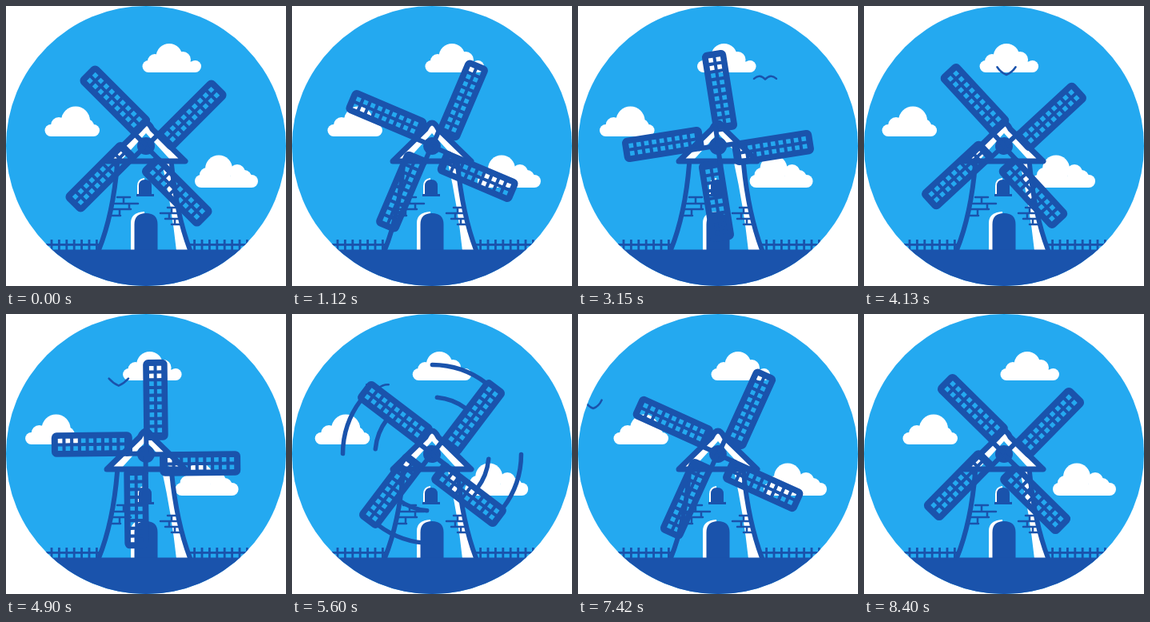
Recreate the animation shown at these times as an HTML page with a canvas. Size 350 by 350 pixels, loop 8470 ms.

```html
<!DOCTYPE html>
<html lang="en">
<head>
<meta charset="utf-8">
<title>Windmill</title>
<style>
  html, body { margin: 0; width: 100%; height: 100%; overflow: hidden; background: #fff; }
  canvas { display: block; width: 100vmin; height: 100vmin; }
</style>
</head>
<body>
<canvas id="stage"></canvas>
<script>
const SIZE = 350, LOOP = 8470, STEP = 70;
const START = 75, TURN = 4266, END = 8458, SWING = TURN - START;
const SKY = '#24a9f0', NAVY = '#1a53ac', WHITE = '#fff';
const canvas = document.getElementById('stage');
const ctx = canvas.getContext('2d');
const scale = Math.max(1, window.devicePixelRatio || 1);
canvas.width = canvas.height = SIZE * scale;

const rad = deg => deg * Math.PI / 180;
const clamp = v => Math.min(1, Math.max(0, v));
const smooth = v => { v = clamp(v); return v * v * (3 - 2 * v); };

function fill(color, path) {
  ctx.fillStyle = color;
  ctx.fill(new Path2D(path));
}

function stroke(width, path) {
  ctx.lineWidth = width;
  ctx.strokeStyle = NAVY;
  ctx.stroke(new Path2D(path));
}

function disc(x, y, r) {
  ctx.beginPath();
  ctx.arc(x, y, r, 0, 2 * Math.PI);
  ctx.fill();
}

// Each cloud: base line y, then its puffs as [x, y, radius]; the first and last puffs are its ends.
const clouds = [
  [83, [178, 75.5, 7.5], [186, 69, 9], [204, 63.5, 16.5], [221, 67, 10], [236.5, 75.5, 7.5]],
  [163, [56, 155.5, 7.5], [66, 149, 10], [87, 143.5, 18], [101, 150, 9], [109.5, 155.5, 7.5]],
  [227, [244, 219, 8], [251, 211, 9], [266, 203.5, 17], [289, 208, 10], [298, 214, 9], [307, 219, 8]]
];

function drawClouds(shift) {
  ctx.save();
  ctx.translate(shift, 0);
  ctx.fillStyle = WHITE;
  for (const [base, ...puffs] of clouds) {
    puffs.forEach(p => disc(...p));
    const left = puffs[0], right = puffs[puffs.length - 1];
    ctx.fillRect(left[0], left[1] - 6, right[0] - left[0], base - left[1] + 6);
  }
  ctx.restore();
}

// Flight path: time, x, y
const flight = [
  [1200, 341, 89], [2240, 286, 97], [4130, 178, 86],
  [5600, 107, 93], [6580, 61, 111], [7900, -5, 122]
];

function drawBird(t) {
  const i = flight.findIndex(p => p[0] > t);
  if (i < 1) return;
  const [t0, x0, y0] = flight[i - 1], [t1, x1, y1] = flight[i];
  const k = (t - t0) / (t1 - t0);
  const flap = 0.4 + 0.6 * Math.cos(2 * Math.PI * (t - 6580) / 790);
  const span = 14 - 4 * Math.max(0, flap) ** 4;
  const tip = -11 * flap, bend = -8 + 6 * flap;
  ctx.save();
  ctx.translate(x0 + (x1 - x0) * k, y0 + (y1 - y0) * k);
  stroke(2.5, `M${-span} ${tip}Q-7 ${bend} 0 0Q7 ${bend} ${span} ${tip}`);
  ctx.restore();
}

function drawFence() {
  ctx.fillStyle = NAVY;
  ctx.fillRect(40, 297, 270, 2.8);
  for (let x = 57; x < 305; x += 9.4) ctx.fillRect(x - 1.4, 292, 2.8, 14);
}

function drawMill() {
  fill(SKY, 'M139 196H207Q213 260 230 306H116Q134 260 139 196Z');
  fill(WHITE, 'M195 196H207Q213 260 230 306H213Q207 250 195 196Z');
  stroke(6, 'M139 198Q134 260 116 305M207 198Q213 260 230 305');
  stroke(2.5, 'M139 239H155M136 247H165M134 254H156M132 262H143M147 239V247M154 247V254M142 254V262');
  stroke(2.5, 'M202 252H212M193 259H214M199 266H216M207 273H218M207 252V259M204 259V266M211 266V273');
  fill(WHITE, 'M164 235V225Q164 216 173 215V235Z');
  fill(NAVY, 'M166 235V225Q166 217 174 217Q182 217 182 225V235H185V238H163V235Z');
  fill(WHITE, 'M156 305V271Q156 258 173 257V305Z');
  fill(NAVY, 'M160.500 305V273Q160.500 259 175 259Q189.500 259 189.500 273V305Z');

  const cap = 'M167 154Q175 138 183 154L224 194H126Z';
  fill(WHITE, cap);
  fill(SKY, 'M175 159L206 193H144Z');
  stroke(7, cap);
}

// Wind trails follow the sails on whichever side lies behind their motion.
function drawTrails(angle, elapsed, direction) {
  const growth = smooth((elapsed - 1000) / 800) * (1 - smooth((elapsed - 1800) / 1080));
  ctx.lineWidth = 5.5;
  ctx.strokeStyle = NAVY;
  for (const [radius, reach] of [[111.5, 98], [71, 85]]) {
    const hidden = direction < 0 ? 24 / radius * 180 / Math.PI : 0;
    const length = reach * growth;
    if (length <= hidden + 0.5) continue;
    for (let q = 0; q < 4; q++) {
      const blade = angle - 90 + 90 * q;
      ctx.beginPath();
      ctx.arc(175, 175, radius, rad(blade - direction * hidden), rad(blade - direction * length), direction > 0);
      ctx.stroke();
    }
  }
}

const sail = new Path2D();
sail.roundRect(-2.5, -118, 30.5, 101, 6.5);
for (let row = 0; row < 9; row++) {
  for (let col = 0; col < 2; col++) sail.rect(5.2 + col * 9.6, -110 + row * 9.7, 5.6, 5.6);
}

function drawSails(angle) {
  ctx.save();
  ctx.translate(175, 175);
  ctx.rotate(rad(angle));
  ctx.fillStyle = NAVY;
  disc(0, 0, 11);
  for (let q = 0; q < 4; q++) {
    ctx.fill(sail, 'evenodd');
    ctx.fillRect(-2.5, -25, 6, 25);
    ctx.rotate(Math.PI / 2);
  }
  ctx.restore();
}

function draw(t) {
  const returning = t >= TURN;
  const swing = smooth((returning ? END - t : t - START) / SWING);
  const angle = 45 - 720 * swing;

  ctx.setTransform(scale, 0, 0, scale, 0, 0);
  ctx.clearRect(0, 0, SIZE, SIZE);
  ctx.lineCap = ctx.lineJoin = 'round';
  ctx.save();
  ctx.beginPath();
  ctx.arc(175, 175, 175, 0, 2 * Math.PI);
  ctx.clip();
  ctx.fillStyle = SKY;
  ctx.fillRect(0, 0, SIZE, SIZE);
  drawClouds(-26 * swing);
  drawBird(t);
  drawFence();
  drawMill();
  drawTrails(angle, t - (returning ? TURN : START), returning ? 1 : -1);
  drawSails(angle);
  ctx.fillStyle = NAVY;
  ctx.fillRect(0, 304.5, SIZE, 46);
  ctx.restore();
}

const start = performance.now();
function tick() {
  const t = (performance.now() - start) % LOOP;
  draw(Math.floor(t / STEP) * STEP);
  requestAnimationFrame(tick);
}
tick();
</script>
</body>
</html>
```
